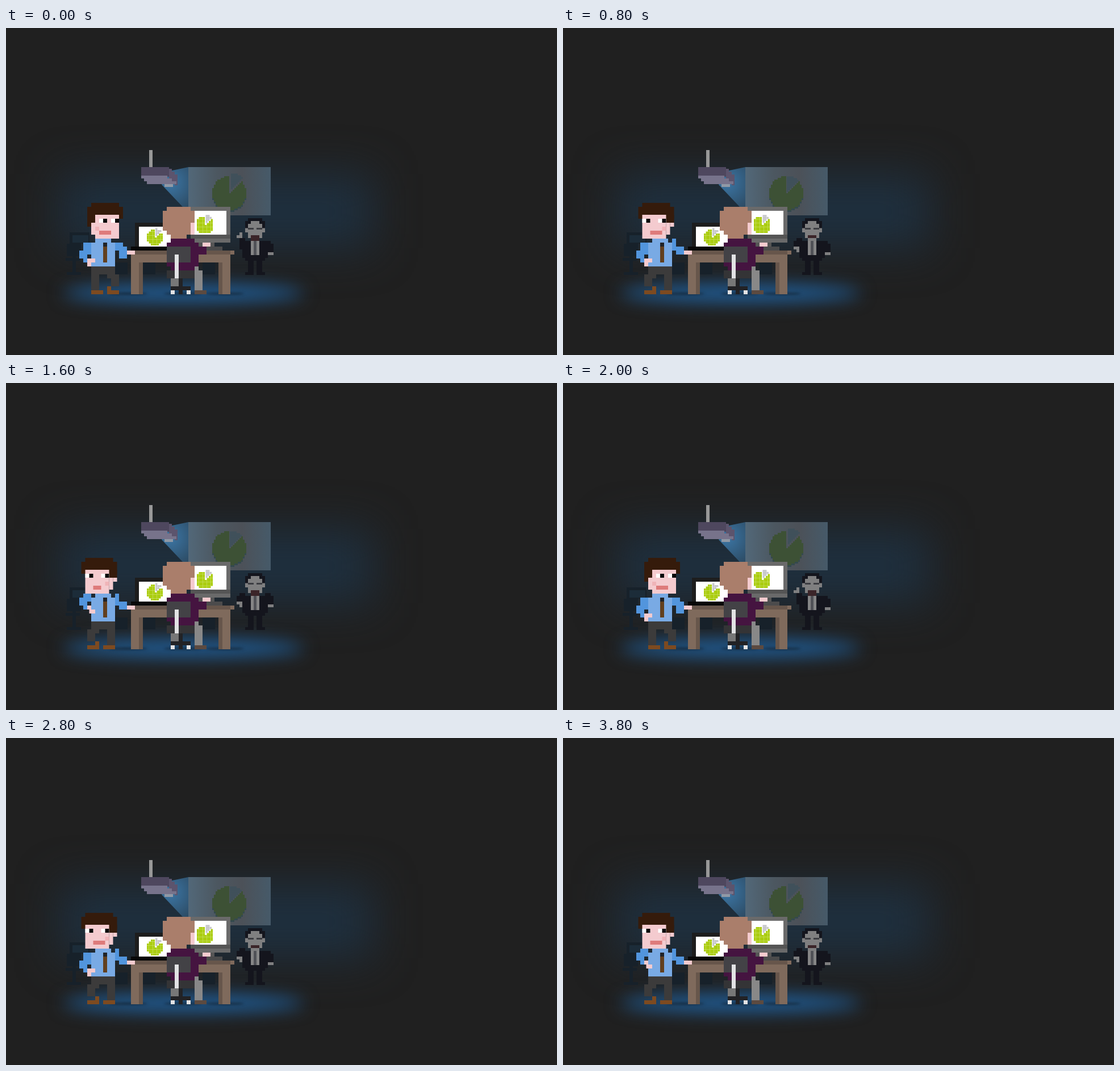
Write an HTML page with a canvas that moves like this. It is 970 by 576 pixels and loops after 4 s.

```html
<!DOCTYPE html>
<html lang="en">
<head>
<meta charset="utf-8">
<title>Office scene</title>
<style>
html, body { margin: 0; width: 100%; height: 100%; overflow: hidden; background: #202020; }
canvas { display: block; }
</style>
</head>
<body>
<canvas id="stage" width="970" height="576"></canvas>
<script>
const ctx = document.getElementById('stage').getContext('2d');
const STEP = 200;

// One character per step.
const tracks = {
  slide:  'pnppnnbpnp',   // pie, near pie, bars
  facing: 'rrrrllllll',
  face:   'cccolsslml',   // calm, open, look, stare, murmur
  left:   'hbhhhbbbbb',   // hip, belly
  right:  'rrrpllllll',   // rest, point, lean
  stride: 'bsbbbbbbbb',   // bent, straight
  raised: '1110000000',
  low:    '1110100101',
  mouth:  '1011011010'
};

function box(color, x, y, w, h) {
  ctx.fillStyle = color;
  ctx.fillRect(x, y, w, h);
}

// Rectangle whose corners step in by one cell per row.
function blob(color, x, y, w, h, top, bottom) {
  for (let r = 0; r < h; r++) {
    const inset = Math.max(0, top - r, bottom - (h - 1 - r));
    box(color, x + inset, y + r, w - 2 * inset, 1);
  }
}

// Square brush stamped cell by cell along a path.
function limb(color, size, ...pts) {
  pts.forEach(([x, y], i) => {
    const [px, py] = pts[Math.max(0, i - 1)];
    const n = Math.max(Math.abs(x - px), Math.abs(y - py), 1);
    for (let k = 0; k <= n; k++)
      box(color, Math.round(px + (x - px) * k / n), Math.round(py + (y - py) * k / n), size, size);
  });
}

function cells(x, y, sx, sy, draw) {
  ctx.save();
  ctx.translate(x, y);
  ctx.scale(sx, sy);
  draw();
  ctx.restore();
}

function disc(cx, cy, r, unit, color, keep) {
  const n = Math.ceil(r / unit);
  for (let j = -n; j < n; j++) for (let i = -n; i < n; i++) {
    const x = (i + .5) * unit, y = (j + .5) * unit;
    if (Math.hypot(x, y) <= r && keep(Math.atan2(y, x)))
      box(color, cx + i * unit, cy + j * unit, unit, unit);
  }
}
const inWedge = a => a > -1.6 && a < -.75;
const offWedge = a => !inWedge(a);
const leftHalf = a => Math.abs(a) > Math.PI / 2;

function haze(color, blur, cx, cy, rx, ry) {
  ctx.save();
  ctx.filter = `blur(${blur}px)`;
  ctx.fillStyle = color;
  ctx.beginPath();
  ctx.ellipse(cx, cy, rx, ry, 0, 0, 7);
  ctx.fill();
  ctx.restore();
}

function room() {
  box('#202020', 0, 0, 970, 576);
  ctx.save();
  ctx.filter = 'blur(38px)';
  box('rgba(31,52,70,.8)', 95, 258, 550, 130);
  ctx.restore();
  haze('#205b92', 15, 312, 467, 212, 17);

  // dim chair and cabinets at the back
  const dim = '#17212a';
  box(dim, 112, 360, 35, 20);
  box('#1c2c39', 117, 365, 28, 13);
  for (let k = 0; k < 3; k++) box(dim, 107 - 2 * (k % 2), 380 + 25 * k, 25, k ? 5 : 22);
  box(dim, 117, 402, 6, 30);
  for (const x of [192, 241, 346]) box(dim, x, 413, 22, 21);
}

function projector() {
  const light = ctx.createRadialGradient(288, 272, 0, 288, 272, 55);
  light.addColorStop(0, '#3c76a5');
  light.addColorStop(1, '#2c4a62');
  ctx.fillStyle = light;
  ctx.beginPath();
  for (const [x, y] of [[288, 252], [321, 245], [321, 317], [311, 315], [274, 276]]) ctx.lineTo(x, y);
  ctx.fill();
  box('#989898', 252, 215, 6, 30);
  box('#4e475e', 238, 245, 49, 17);
  for (let k = 0; k < 3; k++) {
    box('#5c546d', 287 + 5 * k, 248 + 5 * k, 5, 19);
    box('#77738b', 238 + 5 * k, 260 + 5 * k, 46 + 3 * k, 5);
  }
  box('#9099a6', 279, 275, 15, 5);
}

function pie(cx, cy, r, unit, green, grey, gap) {
  disc(cx, cy, r, unit, green, offWedge);
  disc(cx + gap, cy - 2.5 * gap, r * .95, unit, grey, inWedge);
}

function screen(slide) {
  const light = ctx.createLinearGradient(321, 0, 466, 0);
  light.addColorStop(0, '#526879');
  light.addColorStop(.35, '#4c5760');
  light.addColorStop(.65, '#4c5158');
  light.addColorStop(1, '#465a69');
  box(light, 321, 245, 145, 85);
  if (slide === 'b') return bars();
  disc(393, 294, 30, 3, '#34494e', offWedge);
  pie(393, 291, 30, 3, '#3d5135', '#3f505a', slide === 'n' ? 1 : 3);
}

function bars() {
  disc(393, 291, 30, 3, '#3d5135', leftHalf);
  disc(393, 294, 27, 3, '#4b4859', leftHalf);
  box('#374858', 379, 267, 12, 50);
  box('#3d5135', 391, 291, 6, 25);
  for (let k = 0; k < 4; k++) box(k < 2 ? '#4b4859' : '#374858', 397 + 6 * k, 260 - 3 * k, 7, 59 + 3 * k);
  box('#374858', 400, 320, 31, 4);
}

function boss(raised, low, open) {
  const skin = '#7f7f80', suit = '#14151d';
  blob(suit, 3, 0, 7, 4, 1, 0);
  blob(skin, 4, 1, 5, 7, 1, 1);
  for (const x of [3, 9]) box(skin, x, 3.5, 1, 1.5);
  for (const x of [4, 7]) box('#3c3d42', x, 3.4, 2, .6);
  box('#3b2529', 5, 6, 3, open ? 2 : 1);
  blob(suit, 2, 8, 9, 7, 0, 1);
  box('#858586', 5, 8, 3, 5);
  box('#505157', 6, 8, 1, 5);
  for (const x of [4, 7]) {
    box(suit, x, 14, 2, 6);
    box(suit, x === 4 ? 3 : 7, 19, 3, 1);
  }
  limb(suit, 2, [1, 7], [raised ? 1 : 0, raised ? 9 : 8]);
  box(skin, 0, raised ? 6 : 10, 2, 1);
  box(skin, 1, raised ? 5 : 11, 1, 1);
  limb(suit, 2, [10, 7 + low], [11, 9 + low]);
  box(skin, 11, 11 + low, 2, 1);
}

function desk() {
  box('#7f6a5c', 30, 56, 27, 1);
  box('#67564b', 32, 56, 24, 1);
  box('#7f6a5c', 31, 57, 25, 2);
  for (const x of [31, 53]) {
    box('#7f6a5c', x, 59, 3, 8);
    box('#67564b', x === 31 ? 33 : 53, 59, 1, 8);
  }
  box('#1d1d1d', 32, 49, 9, 6);
  box('#080808', 31, 55, 10, 1);
  box('#fff', 33, 50, 8, 5);
  box('#6a6a6a', 46, 45, 10, 9);
  box('#555', 46, 52, 10, 1);
  box('#555', 48, 54, 4, 1);
  box('#fff', 46, 46, 9, 6);
  box('#4b4b4c', 50, 55, 4, 1);
}

function worker() {
  const knit = '#451440', dark = '#343436', pale = '#e2e2e4';
  limb('#888', 2, [46, 60], [47, 62], [47, 64]);
  box('#5c4a40', 47, 66, 3, 1);
  blob(knit, 40, 53, 8, 8, 1, 1);
  limb(knit, 2, [46, 54], [48, 55]);
  box(SKIN, 49, 54, 2, 1);
  blob('#aa7e6b', 39, 45, 8, 8, 1, 2);
  box(SKIN, 46, 49, 1, 3);
  box('#434246', 40, 55, 6, 4);
  box(dark, 40, 61, 7, 2);
  box('#777', 41, 63, 2, 2);
  box('#222225', 43, 63, 1, 4);
  box('#222225', 41, 65, 5, 1);
  box(pale, 42, 57, 1, 6);
  for (const x of [41, 45]) box(pale, x, 66, 1, 1);
}

const SKIN = '#f4cbcf', HAIR = '#351b0b', LIP = '#de7b7b', SLEEVE = '#5295dd',
  PANTS = '#3c3b3b', SHOE = '#7d4a20';

// Drawn facing right; mirrored for the other side.
function head(facing, mood) {
  const right = facing === 'r', stare = mood === 's';
  blob(HAIR, 0, 0, 9, 4, 1, 0);
  box(HAIR, 0, 3, 2, 2);
  box(SKIN, 2, 3, 6, 6);
  box(SKIN, 1, 5, 1, 3);
  box(right ? HAIR : SKIN, 0, 5, 1, 1);
  const y = stare ? 3.5 : 4;
  for (const x of right ? [3, 6] : [2, 6]) {
    box('#fff', x, y, 2, stare ? 1.5 : 1);
    box('#090909', x + (right ? 1 : stare ? .5 : 0), y, 1, 1);
  }
  box('#efb4b8', 2, 6, 1, 1);
  const small = stare || mood === 'm';
  box(LIP, small ? 4 : 3, 7, small ? 2 : 3, 1);
  if (mood === 'o') box(LIP, 4, 8, 2, 1);
}

function legs(stride) {
  box(PANTS, 21, 60, 6, 2);
  box(PANTS, 21, 62, 2, 4);
  if (stride === 's') box(PANTS, 25, 62, 2, 4);
  else {
    limb(PANTS, 2, [25, 61], [26, 62], [26, 63]);
    box(SHOE, 25, 65, 1, 1);
  }
  for (const x of [21, 25]) box(SHOE, x, 66, 3, 1);
}

const leftArm = {
  h() {
    limb(SLEEVE, 2, [19, 54], [18, 56]);
    box(SLEEVE, 19, 58, 1, 1);
    box(SKIN, 20, 58, 2, 1);
    box(SKIN, 20, 59, 1, 1);
  },
  b() {
    limb(SLEEVE, 2, [19, 53], [18, 54]);
    box(SLEEVE, 19, 56, 1, 1);
    box(SKIN, 20, 56, 1, 1);
    box(SKIN, 20.5, 57, 1.5, 1);
  }
};

const rightArm = {
  r() {
    limb(SLEEVE, 2, [27, 54], [28, 56]);
    box(SKIN, 30, 56, 2, 1);
  },
  p() {
    limb(SLEEVE, 2, [27, 54], [28, 54]);
    box(SKIN, 30, 54, 2, 1);
    box(SKIN, 30, 55, 1.5, 1);
  },
  l() {
    limb(SLEEVE, 1, [27, 53], [27, 55]);
    limb(SLEEVE, 2, [28, 55]);
    box(SKIN, 30, 56, 2, 1);
  }
};

function man(now) {
  const right = now.facing === 'r', flip = right ? 1 : -1;
  cells(right ? 0 : 48, 0, flip, 1, () => legs(now.stride));
  box('#79aae4', 21, 54, 6, 6);
  box('#79aae4', 22, 53, 4, 1);
  box('#202328', 24, 54, 1, 1);
  box('#62401f', 24, 55, 1, 4);
  leftArm[now.left]();
  rightArm[now.right]();
  cells(right ? 20 : 27.5, 44, flip, 1, () => head(now.facing, now.face));
}

function draw(step) {
  const now = {};
  for (const name in tracks) now[name] = tracks[name][step];
  room();
  projector();
  screen(now.slide);
  cells(406, 335, 5, 5, () => boss(+now.raised, +now.low, +now.mouth));
  for (const x of [215, 312, 385]) haze('rgba(16,24,32,.6)', 2, x, 468, 34, 2);
  cells(3, 0, 7, 7, desk);
  pie(262, 369, 13.5, 3.5, '#abcd10', '#c7c7cb', 1);
  pie(350, 347, 15.5, 3.5, '#abcd10', '#c7c7cb', 1.5);
  cells(3, 0, 7, 7, () => { worker(); man(now); });
}

let shown = -1;
const start = performance.now();
function tick() {
  const step = Math.floor((performance.now() - start) / STEP) % tracks.slide.length;
  if (step !== shown) draw(shown = step);
  requestAnimationFrame(tick);
}
tick();
</script>
</body>
</html>
```
